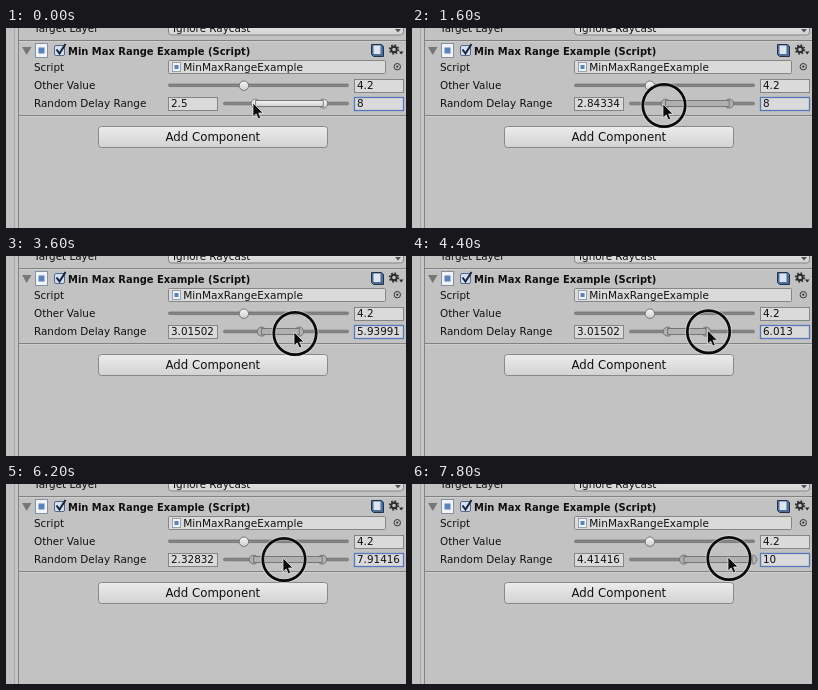
Animation of 400x200 px, one loop 8 s. Source, as an HTML page:

```html
<!DOCTYPE html>
<html lang="en">
<head>
<meta charset="utf-8">
<title>Min max range slider</title>
<style>
html, body { margin: 0; width: 100%; height: 100%; overflow: hidden; background: #c2c2c2; }
svg { display: block; width: 100%; height: 100%; }
text { font: 10.4px "DejaVu Sans", sans-serif; fill: #101010; white-space: pre; }
.title { font-size: 9.95px; font-weight: bold; }
.button { font-size: 11.75px; }
.field { fill: #dadada; stroke: #858585; }
.track { fill: #858585; stroke: #6a6a6a; stroke-width: .7; }
.thumb { fill: url(#knob); stroke: #6c6c6c; stroke-width: .9; }
.bar { fill: url(#knob); stroke: #707070; stroke-width: .9; }
.active .thumb, .active .bar { fill: #b0b0b0; }
</style>
</head>
<body>
<svg viewBox="0 0 400 200" preserveAspectRatio="none">
  <defs>
    <linearGradient id="knob" x2="0" y2="1">
      <stop stop-color="#f6f6f6"/><stop offset="1" stop-color="#cfcfcf"/>
    </linearGradient>
    <linearGradient id="face" x2="0" y2="1">
      <stop stop-color="#ececec"/><stop offset="1" stop-color="#d2d2d2"/>
    </linearGradient>
  </defs>
  <rect width="400" height="200" fill="#c2c2c2"/>
  <rect x="9" width="3" height="200" fill="#c6c6c6"/>
  <path d="M8.5 0V200" stroke="#a8a8a8"/>
  <path d="M12.5 0V200M13 12.5H400M13 87.5H400" stroke="#828282"/>
  <path d="M13 13.5H400M13 88.5H400" stroke="#cecece"/>

  <rect x="162.5" y="-8" width="235" height="15" rx="3" fill="url(#face)" stroke="#858585"/>
  <text x="28" y="4">Target Layer</text>
  <text x="167" y="3.5">Ignore Raycast</text>
  <path d="M389 1H395L392 4.5Z" fill="#555"/>

  <path d="M16 19H25.5L20.7 27Z" fill="#777"/>
  <rect x="29.5" y="15.5" width="12" height="14" fill="#f1f3f6" stroke="#8490a4"/>
  <rect x="32.5" y="19.5" width="6" height="6" fill="#5c82bc"/>
  <rect x="48.5" y="17.5" width="10" height="10" rx="1.5" fill="#d3deee" stroke="#56688a"/>
  <path d="M50.5 21.5L53.5 25.5L59.5 16" fill="none" stroke="#14233f" stroke-width="2"/>
  <text class="title" x="62" y="26.7">Min Max Range Example (Script)</text>
  <path d="M365.5 16.5H375.5L377.5 18.5V28.5H367.5L365.5 26.5Z" fill="#4f6c94" stroke="#22334d"/>
  <path d="M367.5 17.5H374.5V26H367.5Z" fill="#dbe4ef"/>
  <circle cx="388" cy="21.5" r="2.8" fill="none" stroke="#2c2c2c" stroke-width="2"/>
  <circle cx="388" cy="21.5" r="4.4" fill="none" stroke="#2c2c2c" stroke-width="1.6" stroke-dasharray="1.6 1.856"/>
  <path d="M393 23.5H397.5L395.2 26.5Z" fill="#2c2c2c"/>

  <text x="28" y="43">Script</text>
  <rect class="field" x="162.5" y="32.5" width="217" height="13" rx="1"/>
  <rect x="166.5" y="34.5" width="8" height="9" fill="#f1f3f6" stroke="#8490a4" stroke-width=".8"/>
  <rect x="168.5" y="37" width="4" height="4" fill="#5c82bc"/>
  <text x="177.2" y="43" style="font-size:10.55px">MinMaxRangeExample</text>
  <circle cx="391.3" cy="38.7" r="3.2" fill="none" stroke="#333"/>
  <circle cx="391.3" cy="38.7" r="1.1" fill="#333"/>

  <text x="28" y="61">Other Value</text>
  <rect class="track" x="162.5" y="56" width="180" height="2.6" rx="1.3"/>
  <circle class="thumb" cx="237.9" cy="57.7" r="4.7"/>
  <rect class="field" x="348.5" y="51.5" width="49" height="13"/>
  <text x="351" y="61.3">4.2</text>

  <text x="28" y="79">Random Delay Range</text>
  <rect class="field" x="162.5" y="69.5" width="49" height="13"/>
  <text id="minText" x="165" y="79.3"></text>
  <rect class="track" x="217.5" y="74.2" width="125" height="2.6" rx="1.3"/>
  <g id="range">
    <circle id="minThumb" class="thumb" cy="75.6" r="4.5"/>
    <circle id="maxThumb" class="thumb" cy="75.6" r="4.5"/>
    <rect id="bar" class="bar" y="72.5" height="6"/>
  </g>
  <rect class="field" x="348.5" y="69.5" width="49" height="13" style="stroke:#5878b8;stroke-width:1.3"/>
  <text id="maxText" x="351" y="79.3"></text>

  <rect x="92.5" y="98.5" width="229" height="21" rx="3" fill="url(#face)" stroke="#888"/>
  <text class="button" x="159.5" y="113">Add Component</text>

  <g id="cursor">
    <g id="ring" fill="none">
      <circle cx="1" cy="1.5" r="21.3" stroke="#e2e2e2" stroke-width="4.6" opacity=".5"/>
      <circle cx="1" cy="1.5" r="21.2" stroke="#0a0a0a" stroke-width="2.7"/>
    </g>
    <path d="M0 0V13.8L3.2 10.9L5.3 15.8L7.7 14.8L5.6 10H10Z" fill="#0a0a0a" stroke="#f4f4f4" stroke-width=".7"/>
  </g>
</svg>
<script>
const LOOP = 8000, STEP = 200;
const HOVER = 0, PRESS = 1, DRAG = 2;
// time, pointer x, pointer y, range min, range max, pointer state
const keys = [
  [0, 247, 75, 2.5, 8, HOVER],
  [1000, 247, 76, 2.5, 8, DRAG],
  [1600, 251, 76, 2.84334, 8, DRAG],
  [1800, 253, 76, 3.01502, 8, HOVER],
  [2200, 322, 74, 3.01502, 8, DRAG],
  [2600, 337, 74, 3.01502, 9.28755, DRAG],
  [3000, 332, 75, 3.01502, 8.9, DRAG],
  [3600, 288, 76, 3.01502, 5.93991, DRAG],
  [4000, 277, 75, 3.01502, 4.9956, DRAG],
  [4600, 302, 74, 3.01502, 6.36909, HOVER],
  [5000, 302, 74, 3.01502, 6.36909, PRESS],
  [5200, 309, 74, 3.01502, 6.96997, DRAG],
  [5600, 328, 74, 3.01502, 8.60086, HOVER],
  [6000, 285, 74, 3.01502, 8.60086, DRAG],
  [6200, 277, 74, 2.32832, 7.91416, DRAG],
  [6600, 267, 74, 1.46992, 7.05576, DRAG],
  [7400, 312, 73, 4.41416, 10, DRAG],
  [7800, 316, 73, 4.41416, 10, DRAG],
  [LOOP, 316, 73, 4.41416, 10, DRAG]
];

const el = id => document.getElementById(id);
const set = (id, attrs) => {
  for (const name in attrs) el(id).setAttribute(name, attrs[name]);
};
const format = v => String(+v.toFixed(5));
const toX = v => 220.5 + 11.65 * v;

function pose(t) {
  const i = keys.findIndex(k => k[0] > t) - 1;
  const a = keys[i], b = keys[i + 1];
  const p = (t - a[0]) / (b[0] - a[0]);
  const ease = p * p * (3 - 2 * p);
  return [...a.slice(1, 5).map((v, n) => v + (b[n + 1] - v) * ease), a[5]];
}

function draw(time) {
  const t = Math.floor((time % LOOP) / STEP) * STEP;
  const [x, y, min, max, state] = pose(t);
  const left = toX(min), right = toX(max) + 3.5;
  set('bar', { x: left, width: right - left });
  set('minThumb', { cx: left });
  set('maxThumb', { cx: right });
  set('range', { class: state === DRAG ? 'active' : '' });
  el('minText').textContent = format(min);
  el('maxText').textContent = format(max);
  set('cursor', { transform: `translate(${x} ${y})` });
  set('ring', { visibility: state === HOVER ? 'hidden' : 'visible' });
}

const start = performance.now();
function tick() {
  draw(performance.now() - start);
  requestAnimationFrame(tick);
}
tick();
</script>
</body>
</html>
```
